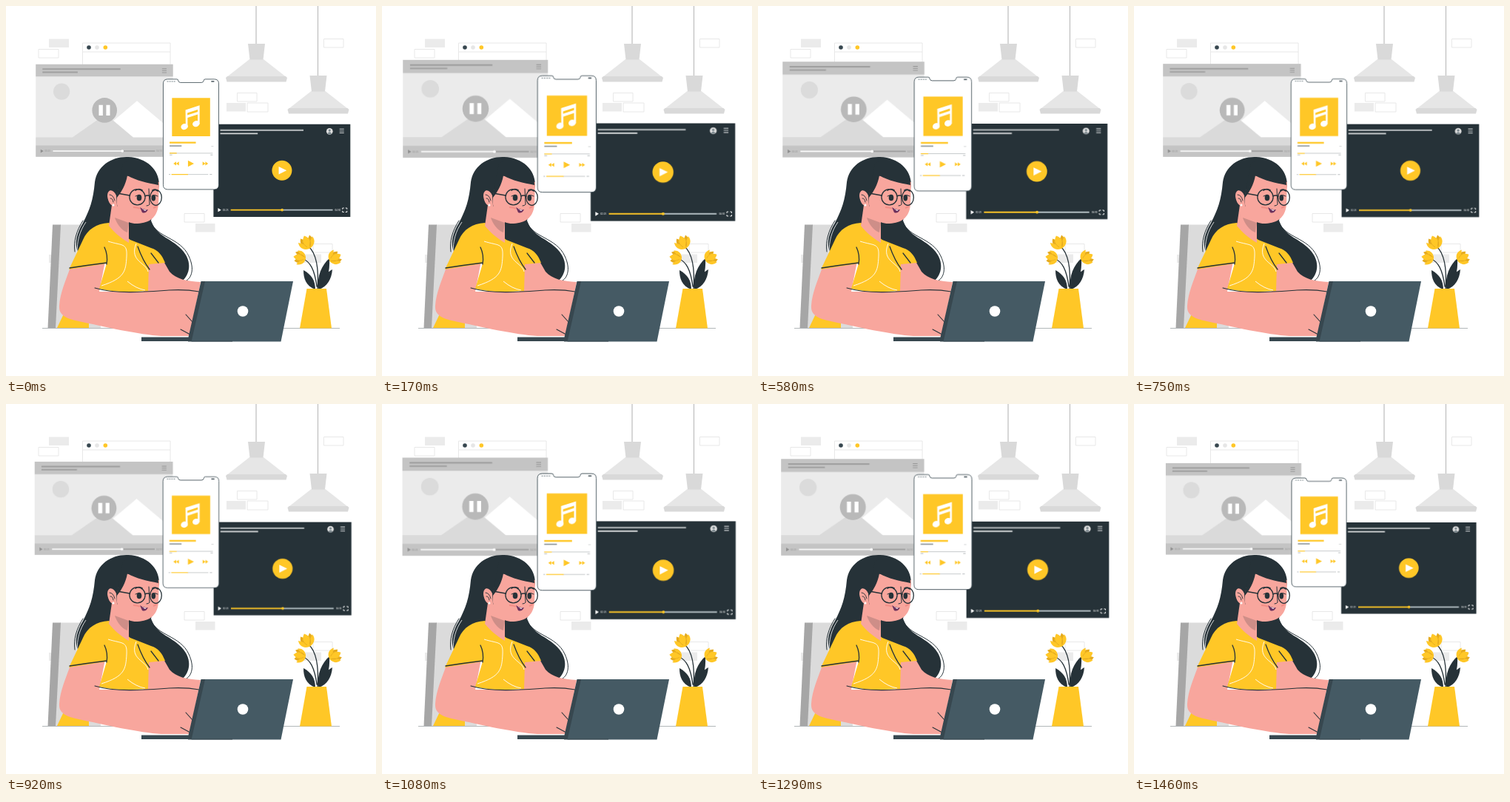
Animation of 500 by 500 pixels, one loop 1500 ms. Source, as an HTML page without scripts:

```html
<!DOCTYPE html>
<html lang="en">
<head>
<meta charset="utf-8">
<title>Watching media</title>
<style>
  html, body { margin: 0; width: 100%; height: 100%; overflow: hidden; background: #fff; }
  svg { display: block; width: 100vw; height: 100vh; }
  text { font: 3px Roboto, sans-serif; }
  .ink { fill: #263238; }
  .gold { fill: #ffc727; }
  .amber { fill: #e5ab20; }
  .skin { fill: #f8a69d; }
  .white { fill: #fff; }
  .pale { fill: #ebebeb; }
  .line { fill: none; stroke: #263238; stroke-linecap: round; stroke-linejoin: round; }
  .frame { fill: #fff; stroke: #e3e3e3; stroke-width: .8; }
  .screens {
    transform-origin: 252.7px 181.8px;
    animation: heartbeat 1.5s linear -640ms infinite;
  }
  @keyframes heartbeat {
    0%, 40%, 100% { transform: scale(1); }
    20%, 60% { transform: scale(1.1); }
  }
</style>
</head>
<body>
<svg viewBox="0 0 500 500">
  <defs>
    <g id="lamp">
      <path d="M338 -50V52" stroke="#bdbdbd" stroke-width="1.2"/>
      <path fill="#e6e6e6" d="M329 72H348L378 95.500H299Z"/>
      <path fill="#d9d9d9" d="M327 51H350L347.500 72.500H329.500ZM299 95H378L380 97 378.500 102.500H298.500L297 97Z"/>
    </g>
    <path id="menu" d="M0 0H6M0 2.600H6M0 5.200H6" stroke-width="1"/>
    <path id="skip" d="M0 -2.600L3.700 0 0 2.600ZM3.700 -2.600L7.400 0 3.700 2.600Z"/>
    <g id="flower">
      <path class="amber" d="M0 0C-9 -3 -10 -11 -6 -17L1 -11 7 -17C12 -9 9 -2 0 0Z"/>
      <path class="gold" d="M0 0C-7 -5 -6 -14 0 -19 7 -13 7 -5 0 0ZM-1 0C-10 -1 -12 -8 -11 -13 -6 -10 -2 -6 -1 0ZM1 0C9 -2 12 -8 10 -14 5 -10 2 -6 1 0Z"/>
      <path d="M-2 -3C-4 -6 -5 -9 -5 -11M2 -3C4 -6 5 -9 5 -11" fill="none" stroke="#e5ab20" stroke-width=".8"/>
    </g>
  </defs>

  <rect class="white" width="500" height="500"/>

  <g id="room">
    <path class="pale" d="M58 44.500H85V56H58ZM298 131H324V142.500H298ZM256 294H282.500V305.500H256ZM399 335.500H426V347H399ZM58 336H80V347H58Z"/>
    <path class="frame" d="M44 58.500H71V70H44ZM429.500 44.500H456V56H429.500ZM312.500 117.500H339V129H312.500ZM326 131H354V143H326ZM241 280.500H268V292H241ZM415 321.500H441V333H415Z"/>
    <path class="frame" d="M103.500 50H222V110H103.500ZM103.500 62H222"/>
    <circle cx="112" cy="56" r="2.800" fill="#37474f"/>
    <circle cx="123" cy="56" r="2.800" fill="#e6e6e6"/>
    <circle class="gold" cx="134.300" cy="56" r="2.800"/>
    <use href="#lamp"/>
    <use href="#lamp" x="83.500" y="43"/>
  </g>

  <g class="screens">
    <g id="film">
      <path class="pale" d="M43 80H226V203.500H43Z"/>
      <path fill="#c4c4c4" d="M43 80H226V96.500H43ZM43 188H226V203.500H43Z"/>
      <path d="M52 86.500H156M52 90.700H99" stroke="#a0a0a0" stroke-width="2"/>
      <use href="#menu" x="211.500" y="86" stroke="#999"/>
      <circle cx="77.500" cy="116.500" r="11" fill="#dbdbdb"/>
      <path class="white" d="M120 178L178 129 236 178Z"/>
      <path fill="#dadada" d="M43 177.500H92L133 149Q136 147.500 139 149L173 177.500H226V188.500H43Z"/>
      <circle cx="134.800" cy="141.500" r="16.600" fill="#b9b9b9"/>
      <path class="white" d="M127.200 134.500H132.500V148.500H127.200ZM137 134.500H142V148.500H137Z"/>
      <path fill="#8e8e8e" d="M49.500 193.500L53.500 195.800 49.500 198.200Z"/>
      <text x="55" y="197" fill="#999">00:25</text>
      <text x="204" y="197" fill="#999">04:10</text>
      <path d="M160 195.800H202" stroke="#9c9c9c" stroke-width="1.600"/>
      <path d="M66 195.800H158" stroke="#fff" stroke-width="1.600"/>
      <circle class="white" cx="158.500" cy="195.800" r="1.800"/>
    </g>

    <g id="player">
      <path class="ink" d="M280 160H462.500V283.500H280Z"/>
      <path d="M289 168H400" stroke="#a9aeb1" stroke-width="2.100"/>
      <path d="M289 172.500H339" stroke="#d4d7d8" stroke-width="1.700"/>
      <circle cx="434.800" cy="169.500" r="4.300" fill="#e0e0e0"/>
      <circle cx="434.800" cy="168.300" r="1.500" fill="#78858b"/>
      <path fill="#78858b" d="M432 172.500Q434.800 168.500 437.600 172.500Q434.800 174.500 432 172.500Z"/>
      <use href="#menu" x="448" y="166.500" stroke="#c8cccd"/>
      <circle class="gold" cx="371.300" cy="221.700" r="13.300"/>
      <path class="white" d="M367 216.500L377.500 221.700 367 227Z"/>
      <path class="white" d="M286 271.800L290.300 274.400 286 277Z"/>
      <text class="white" x="292.300" y="275.500">02:25</text>
      <text class="white" x="442" y="275.500">04:50</text>
      <path d="M371 274.400H439" stroke="#b5c0c5" stroke-width="1.800"/>
      <path d="M303 274.400H371" stroke="#ffc727" stroke-width="1.800"/>
      <circle class="gold" cx="371.500" cy="274.400" r="1.800"/>
      <path d="M452 273.500V271.800H454M456 271.800H458V273.500M458 275.500V277.200H456M454 277.200H452V275.500" fill="none" stroke="#fff" stroke-width=".9"/>
    </g>

    <g id="phone">
      <path d="M219 100H231Q233 100 233 102 233.500 104.500 236 104.500H264Q266.500 104.500 267 102 267 100 269 100H281Q287 100 287 106V241Q287 247 281 247H219Q213 247 213 241V106Q213 100 219 100Z" fill="#fff" stroke="#37474f" stroke-width=".8"/>
      <path d="M218 103H229" stroke="#78858b" stroke-width="1" stroke-dasharray="2 1"/>
      <path d="M277 103H281" stroke="#546067" stroke-width="1.600"/>
      <path class="gold" d="M224.700 125H275.500V176H224.700Z"/>
      <g class="white">
        <ellipse cx="241.300" cy="163.300" rx="4.700" ry="4" transform="rotate(-20 241.300 163.300)"/>
        <ellipse cx="256.700" cy="159.500" rx="4.700" ry="4" transform="rotate(-20 256.700 159.500)"/>
        <path d="M242.700 141L261.500 135V160H259V147L245.500 151.500V164H243Z"/>
        <path class="gold" d="M245.200 145L259 140.500V143.500L245.200 148Z"/>
      </g>
      <path d="M221.500 184.700H256.500" stroke="#ffc727" stroke-width="2.200"/>
      <path d="M221.500 189H237.500" stroke="#929a9e" stroke-width="1.600"/>
      <path d="M277 189.500H280" stroke="#c3c7c9" stroke-width=".7"/>
      <path d="M221.500 198.700H279M245 227H273" stroke="#c3c7c9" stroke-width=".9"/>
      <path d="M221.500 198.700H231M224 227H246" stroke="#ffc727" stroke-width="1.100"/>
      <path d="M221.500 201H225M276 201H279M220.500 227H222.500M275 227H278" stroke="#aab0b3" stroke-width=".8"/>
      <g class="gold">
        <use href="#skip" transform="translate(234 212.500) scale(-1 1)"/>
        <path d="M246 208.300L254 212.500 246 216.700Z"/>
        <use href="#skip" x="265.500" y="212.500"/>
      </g>
    </g>
  </g>

  <path d="M49 435.500H451" stroke="#9fa5a8" stroke-width=".8"/>

  <g id="chair">
    <path fill="#dbdbdb" d="M73 295.500H108Q118 296 119 308L128 435H65Z"/>
    <path fill="#a6a6a6" d="M63 295.500H74L67 435H56.500Z"/>
  </g>

  <g id="woman">
    <path class="ink" d="M165 204C143 203 123 216 120 238 118 262 113 276 104 293 94 310 91 327 101 338L150 330 190 372H238C249 362 251 346 240 332 226 314 204 313 196 290L207 242C207 221 190 205 165 204Z"/>
    <path class="line" d="M104 290C95 304 91 318 93 332M196 292C203 313 236 313 247 338 256 357 250 370 240 373" stroke-width="1"/>
    <path d="M108 292C99 305 96 318 96 334" fill="none" stroke="#fff" stroke-width=".8"/>

    <path class="gold" d="M79 414L69 435H112V412Z"/>
    <path class="skin" d="M87 353C81 370 73 388 72 405 71 418 82 422 94 425 135 434 180 444 210 446L248 446 263 373C244 372 230 369 221 359L213 345 190 349 186 386H126L134 345Z"/>
    <path class="gold" d="M139 293C122 294 110 302 104 316L85 356 136 348 126 382C150 388 172 386 192 385L193 349 215 347C211 337 206 330 196 327L168 316Z"/>

    <path class="skin" d="M144 262L139 297C146 306 156 314 166 320L166 291Z"/>
    <path class="ink" d="M166 293L164 306C156 303 150 295 147 286Z" opacity=".2"/>
    <path class="skin" d="M161 229C153 239 149 253 150 268 152 284 163 295 178 294 194 293 204 286 206 269L207 238Z"/>
    <path class="ink" d="M158 212C181 203 206 214 206 242 191 239 176 236 164 229 162 241 156 252 149 260Z"/>
    <path class="skin" d="M149 256C145 247 137 247 137 257 138 266 143 273 150 270Z"/>
    <path class="line" d="M140 255Q145 255 147 263M141 260Q144 259 145 265" stroke-width=".9"/>
    <circle class="white" cx="145" cy="269" r="1.500"/>
    <path d="M172 272Q178 272 181 274M199 273Q202 272 204 270" fill="none" stroke="#f28d86" stroke-width="2"/>

    <g class="line">
      <g stroke-width="1.300">
        <circle cx="177.500" cy="258.300" r="10.600"/>
        <ellipse cx="202.500" cy="258.800" rx="7.800" ry="10.500"/>
        <path d="M153 253.500L167 256M188 257Q191 255 195 257"/>
      </g>
      <path d="M193 247L194 268Q193 270 190 270" stroke-width="1"/>
      <path d="M175 249Q180 246 184 249M198 249Q202 247 205 250" stroke-width="1.700"/>
      <path d="M175 257L179 255.500M205 257L201 255.500" stroke-width="1"/>
    </g>
    <ellipse class="ink" cx="180" cy="259" rx="3.300" ry="4.300"/>
    <ellipse class="ink" cx="199.300" cy="259.300" rx="2.800" ry="4.200"/>
    <path fill="#6c315c" d="M181 272Q186 276 192 275 189 281 184 279Z"/>
    <path class="white" d="M183 273.500Q187 276 190 275.500L188 277Z"/>

    <g class="line">
      <path d="M86 354Q112 350 136 347M133 326Q138 336 136 349M178 325C183 339 187 347 194 356M196 334L206 347" stroke-width="1.300"/>
      <path d="M120 381C150 390 192 386 220 384 237 383 250 384 261 386M243 417L252 427M236 437L249 444" stroke-width="1.100"/>
    </g>
    <path d="M138 318C157 324 164 320 163 338 162 359 160 368 129 378M176 321C166 345 190 347 192 359M164 372Q176 382 188 384" fill="none" stroke="#fff" stroke-width=".9"/>
  </g>

  <g id="laptop">
    <path fill="#37474f" d="M263.500 372H271L253 453H183V447.500H246.500Z"/>
    <path fill="#455a64" d="M269 372H388L371.500 453.500H250.500Z"/>
    <path d="M246 453H306" stroke="#37474f" stroke-width="1"/>
    <circle class="white" cx="320" cy="412.500" r="7.300"/>
  </g>

  <g id="plant">
    <path class="line" d="M421 383C423 354 420 335 409 325M420 379C417 356 411 345 400 341M422 379C425 356 431 345 441 341" stroke-width="1.300"/>
    <path class="ink" d="M418 383C405 378 402 368 402 357 413 363 418 371 418 383ZM422 383C420 364 427 350 437 341 438 360 434 373 422 383ZM423 383C425 370 432 361 441 356 440 369 434 379 423 383Z"/>
    <use href="#flower" transform="translate(410 328) rotate(-22)"/>
    <use href="#flower" transform="translate(405 341) rotate(-82) scale(.88)"/>
    <use href="#flower" transform="translate(437 344) rotate(62) scale(.92)"/>
    <path class="gold" d="M406.500 382H433L440 435.500H397Z"/>
  </g>
</svg>
</body>
</html>
```
